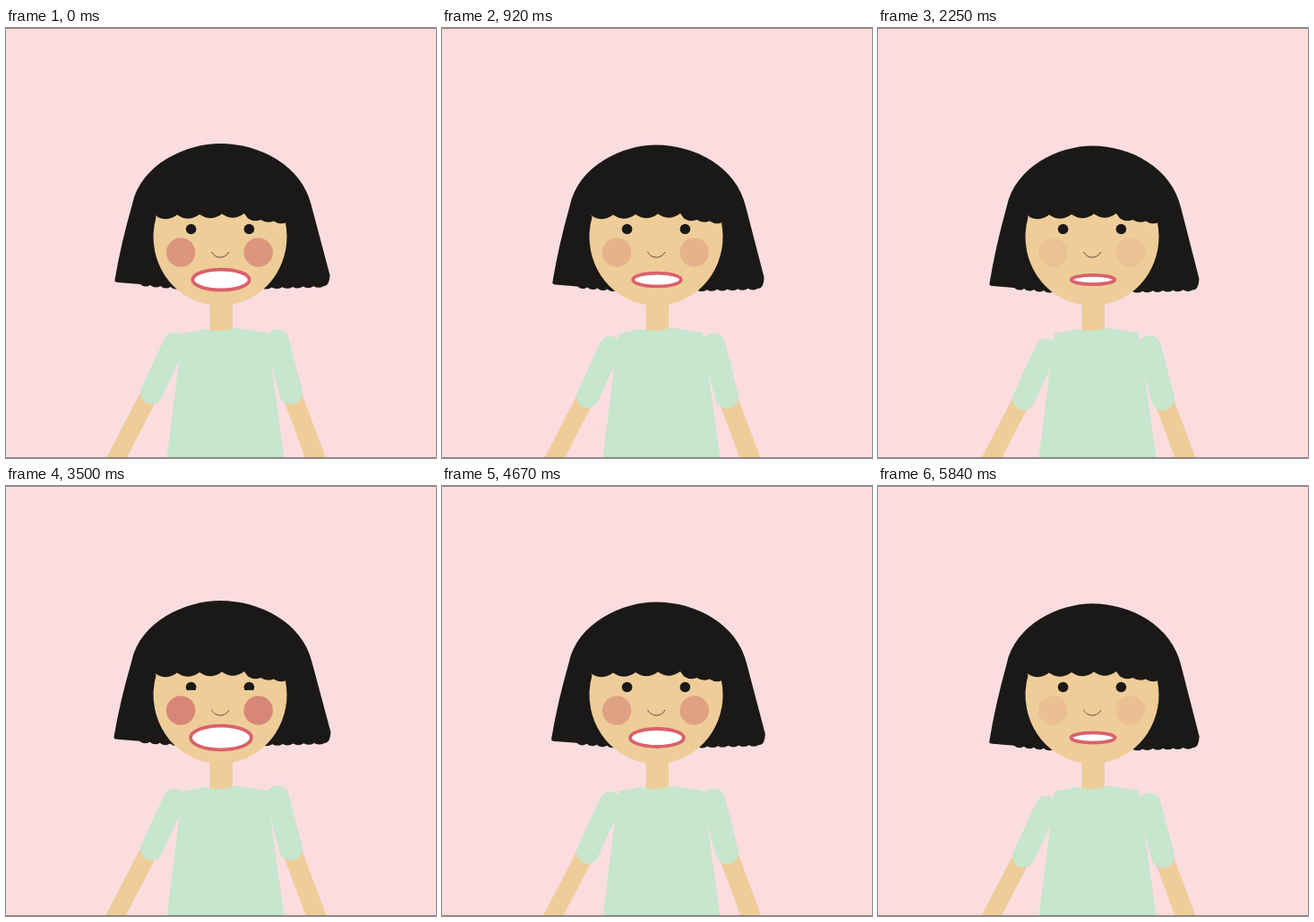
Recreate the animation shown at these times as an HTML page with a canvas. Size 480 px wide and 480 px high, loop 5.93 s.

```html
<!DOCTYPE html>
<html lang="en">
<head>
<meta charset="utf-8">
<title>Smiling girl</title>
<style>
  html, body { margin: 0; width: 100%; height: 100%; overflow: hidden; background: #fbdde0; }
  canvas { display: block; width: 480px; height: 480px; }
</style>
</head>
<body>
<canvas id="stage" width="480" height="480"></canvas>
<script>
const ctx = document.getElementById('stage').getContext('2d');
const LOOP = 5930, STEP = 1000 / 12, LAST = 70;
const SKIN = '#eecd99', HAIR = '#1b1917', SHIRT = '#c6e6cd';

// Peaks and troughs of the smile: [ms, strength]
const SMILE = [
  [0, .52], [680, 1], [960, .13], [1560, .45], [2250, 0],
  [3860, .78], [4210, .15], [4760, .42], [5840, .03]
];

function smileAt(t) {
  const i = Math.max(1, SMILE.findIndex(key => key[0] >= t));
  const [t0, a] = SMILE[i - 1], [t1, b] = SMILE[i];
  const u = (t - t0) / (t1 - t0);
  return a + (b - a) * u * u * (3 - 2 * u);
}

function fillPath(color, build) {
  ctx.beginPath();
  build();
  ctx.closePath();
  ctx.fillStyle = color;
  ctx.fill();
}

function ellipse(color, x, y, rx, ry = rx) {
  fillPath(color, () => ctx.ellipse(x, y, rx, ry, 0, 0, Math.PI * 2));
}

function limb(color, width, x0, y0, x1, y1) {
  ctx.beginPath();
  ctx.moveTo(x0, y0);
  ctx.lineTo(x1, y1);
  ctx.lineCap = 'round';
  ctx.lineWidth = width;
  ctx.strokeStyle = color;
  ctx.stroke();
}

// A row of equal hanging curls from one point to another
function curls(x0, y0, x1, y1, count, depth) {
  const dx = (x1 - x0) / count, dy = (y1 - y0) / count;
  ctx.lineTo(x0, y0);
  for (let i = 1; i <= count; i++) {
    const x = x0 + dx * i, y = y0 + dy * i;
    ctx.quadraticCurveTo(x - dx / 2, y - dy / 2 + depth, x, y);
  }
}

function drawHair(s) {
  const top = 131.5;
  ctx.save();
  ctx.translate(241, top - 5 * s);
  ctx.scale(1 + .05 * s, 1 - .018 * s);
  ctx.translate(-241, -top);
  fillPath(HAIR, () => {
    ctx.moveTo(124.5, 285);
    ctx.quadraticCurveTo(131, 245, 143.5, 200);
    ctx.bezierCurveTo(153, 154, 203, top, 239, top);
    ctx.bezierCurveTo(283, top, 328, 157, 338, 200);
    ctx.lineTo(358.5, 280);
    ctx.quadraticCurveTo(358, 292, 352, 292.5);
    curls(352, 292, 284, 294, 6, 3.5);
    curls(196, 294, 152, 290, 4, 4);
    ctx.lineTo(128, 288);
    ctx.quadraticCurveTo(124, 288, 124.5, 285);
  });
  ctx.restore();
}

function drawArms(s) {
  ctx.save();
  ctx.translate(0, -13 * s);
  limb(SKIN, 20, 160, 416, 106, 520);
  limb(SKIN, 21.5, 319.5, 417, 358, 520);
  limb(SHIRT, 25, 188, 359, 162.5, 414);
  limb(SHIRT, 26, 303, 356, 318, 414);
  ctx.restore();
}

function drawTorso() {
  ctx.fillStyle = SKIN;
  ctx.fillRect(227.5, 295, 25.5, 47);
  fillPath(SHIRT, () => {
    ctx.moveTo(197, 341);
    ctx.lineTo(222, 336);
    ctx.quadraticCurveTo(240, 341, 255, 334.5);
    ctx.lineTo(291, 340);
    ctx.lineTo(310.5, 480);
    ctx.lineTo(179.5, 480);
  });
}

// The fringe forms the upper edge of the skin
function drawFace() {
  fillPath(SKIN, () => {
    curls(166, 209, 266, 207, 4, 9);
    curls(270, 212.5, 313, 217, 3, 4);
    ctx.ellipse(239, 233, 74.5, 77, 0, -.21, Math.PI + .29);
  });
}

function drawEyesAndCheeks(s) {
  const lid = 230.5 - 15 * Math.max(0, s - .5);
  const blush = `rgba(200,85,95,${.09 + .72 * s})`;
  for (const side of [-1, 1]) {
    const eye = 239 + side * 32.4;
    ellipse(HAIR, eye, 224.5, 5.8);
    ellipse(SKIN, eye, lid + 12, 18, 12);
    ellipse(blush, 238.4 + side * 43.3, 250.5, 16.2);
  }
}

function drawNose() {
  ctx.beginPath();
  ctx.moveTo(229.5, 250);
  ctx.bezierCurveTo(234, 258, 244.5, 258, 249, 250);
  ctx.lineWidth = 1;
  ctx.strokeStyle = '#5a4838';
  ctx.stroke();
}

function drawMouth(s) {
  ellipse('#fff', 240, 281, 24.2 + 14.3 * s, 5.2 + 12 * s);
  ctx.lineWidth = 3.8;
  ctx.strokeStyle = '#d9626a';
  ctx.stroke();
}

function draw(now) {
  const frame = Math.min(LAST, Math.floor((now % LOOP + 5) / STEP));
  const s = smileAt(frame * STEP);
  ctx.fillStyle = '#fbdde0';
  ctx.fillRect(0, 0, 480, 480);
  drawHair(s);
  drawArms(s);
  drawTorso();
  drawFace();
  drawEyesAndCheeks(s);
  drawNose();
  drawMouth(s);
  ctx.fillStyle = 'rgba(90,75,78,.6)';
  ctx.fillRect(0, 0, 480, 1);
  ctx.fillRect(0, 479, 480, 1);
}

let start;
function tick(now) {
  start ??= now;
  draw(now - start);
  requestAnimationFrame(tick);
}
draw(0);
requestAnimationFrame(tick);
</script>
</body>
</html>
```
